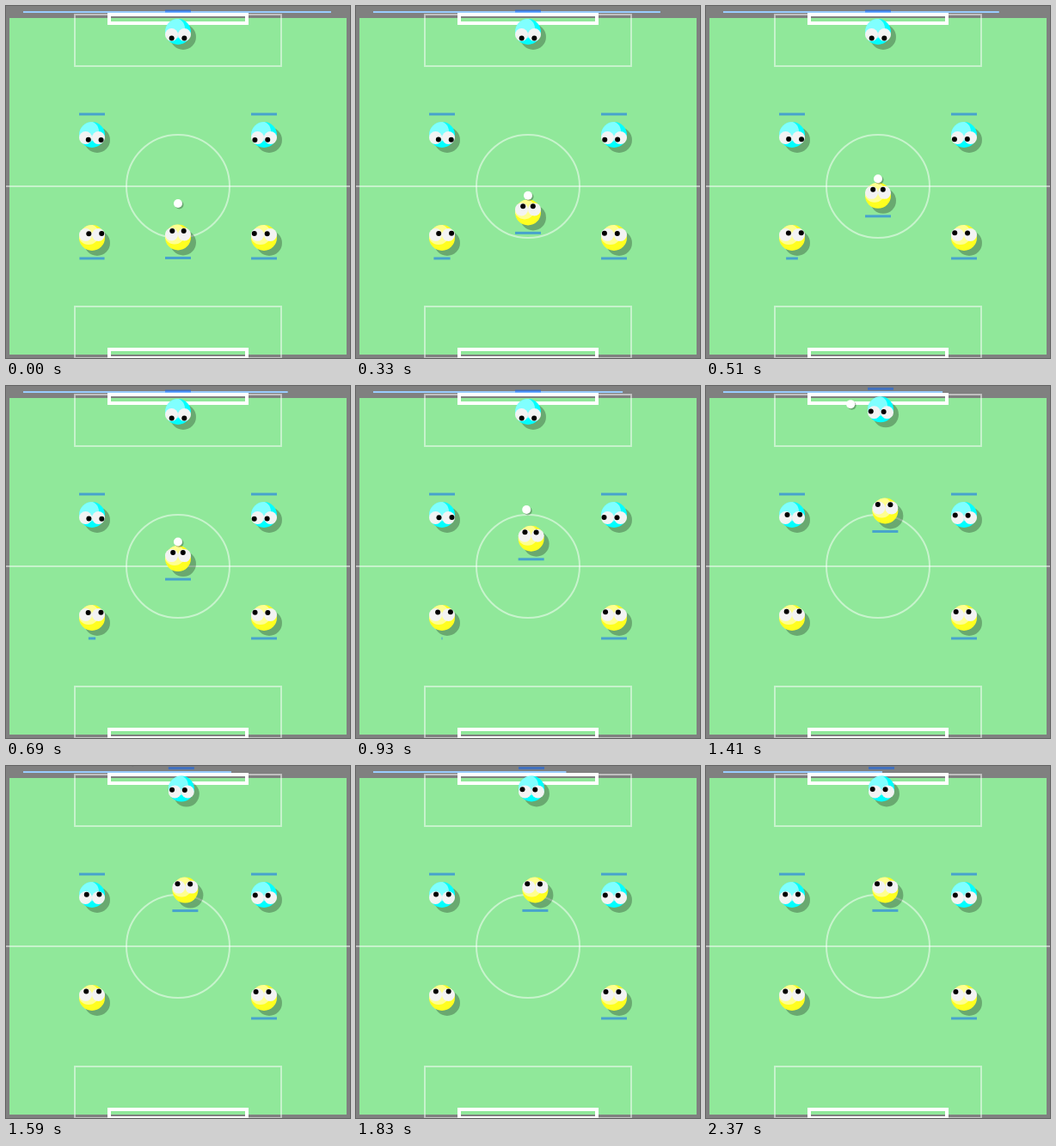
Write an HTML page with a canvas that moves like this. It is 400 px wide and 410 px high and loops after 2400 ms.

```html
<!DOCTYPE html>
<html lang="en">
<head>
<meta charset="utf-8">
<title>Football</title>
<style>
  html, body { margin: 0; width: 100%; height: 100%; overflow: hidden; background: #808080; }
  canvas { display: block; }
</style>
</head>
<body>
<canvas id="stage" width="400" height="410"></canvas>
<script>
const ctx = document.getElementById('stage').getContext('2d');

const LOOP = 2400, STEP = 30;
const KICK = 870, STOP = 1165, SAVE = 1262;
const RUN = 0.11, DRAG = 0.0096, ROLL_DRAG = 0.0006;
const CYAN = '#00ffff', YELLOW = '#ffff20';
const SHADOW = 'rgba(0,0,0,0.27)';

// Share of a coasting distance covered after a time, under friction.
const coast = (time, drag = DRAG) => time > 0 ? 1 - Math.exp(-drag * time) : 0;

function disc(x, y, r, color) {
  ctx.fillStyle = color;
  ctx.beginPath();
  ctx.arc(x, y, r, 0, Math.PI * 2);
  ctx.fill();
}

function line(x1, x2, y, width, color) {
  ctx.strokeStyle = color;
  ctx.lineWidth = width;
  ctx.beginPath();
  ctx.moveTo(x1, y);
  ctx.lineTo(x2, y);
  ctx.stroke();
}

function drawPitch() {
  ctx.fillStyle = '#808080';
  ctx.fillRect(0, 0, 400, 410);
  ctx.fillStyle = '#90e89a';
  ctx.fillRect(4, 14, 392, 392);

  const chalk = 'rgba(255,255,255,0.5)';
  line(0, 400, 210, 2, chalk);
  ctx.beginPath();
  ctx.arc(200, 210, 60, 0, Math.PI * 2);
  ctx.stroke();
  ctx.strokeRect(80, 10, 240, 60);
  ctx.strokeRect(80, 350, 240, 60);

  ctx.strokeStyle = '#fff';
  ctx.lineWidth = 4;
  ctx.strokeRect(120, 10, 160, 10);
  ctx.strokeRect(120, 400, 160, 10);
}

function strikerAt(t) {
  return {
    x: 200 + 8.4 * coast(t - KICK),
    y: 269.5 - RUN * Math.min(t, STOP) + 7.5 * coast(t)
      + 7 * coast(t - KICK) - RUN / DRAG * coast(t - STOP)
  };
}

function ballAt(t) {
  if (t < KICK) return { x: 200, y: Math.min(230, strikerAt(t).y - 19.6) };
  const flight = Math.min(t, SAVE) - KICK;
  const glide = coast(t - SAVE, ROLL_DRAG) / ROLL_DRAG;
  return {
    x: 200 - 0.0296 * flight - 0.143 * glide,
    y: strikerAt(KICK).y - 19.6 - 0.295 * flight - 0.176 * glide
  };
}

// side is 1 for players facing down, -1 for players facing up.
function drawPlayer(x, y, side, ball, energy = 30) {
  disc(x + 6, y + 6, 15, SHADOW);
  disc(x, y, 15, side > 0 ? CYAN : YELLOW);

  ctx.save();
  ctx.beginPath();
  ctx.arc(x, y, 15, 0, Math.PI * 2);
  ctx.clip();
  disc(x - 4, y - 4, 12, 'rgba(255,255,255,0.5)');
  ctx.restore();

  const eyeY = y + 3.5 * side;
  const eyes = [x - 7.5, x + 7.5];
  for (const eyeX of eyes) disc(eyeX, eyeY, 7.5, '#f3f3f3');
  for (const eyeX of eyes) {
    const angle = Math.atan2(ball.y - eyeY, ball.x - eyeX);
    disc(eyeX + 4 * Math.cos(angle), eyeY + 4 * Math.sin(angle), 3, '#000');
  }

  if (energy > 0) {
    line(x - energy / 2, x + energy / 2, y - 24 * side, 3, 'rgba(0,96,255,0.5)');
  }
}

function draw(t) {
  const ball = ballAt(t), striker = strikerAt(t), save = coast(t - SAVE);
  drawPitch();
  line(20, 378 - 0.073 * t, 7, 2, '#99ccff');

  drawPlayer(200 + 4 * save, 30 - 3.6 * save, 1, ball);
  drawPlayer(100, 150, 1, ball);
  drawPlayer(300, 150, 1, ball);
  drawPlayer(100, 270, -1, ball, 29.2 - 0.0303 * t);
  drawPlayer(striker.x, striker.y, -1, ball);
  drawPlayer(300, 270, -1, ball);

  disc(ball.x + 1.5, ball.y + 1.5, 5, SHADOW);
  disc(ball.x, ball.y, 5, '#fff');
}

const start = performance.now();
function tick() {
  const t = (performance.now() - start) % LOOP;
  draw(Math.floor(t / STEP) * STEP);
  requestAnimationFrame(tick);
}
tick();
</script>
</body>
</html>
```
